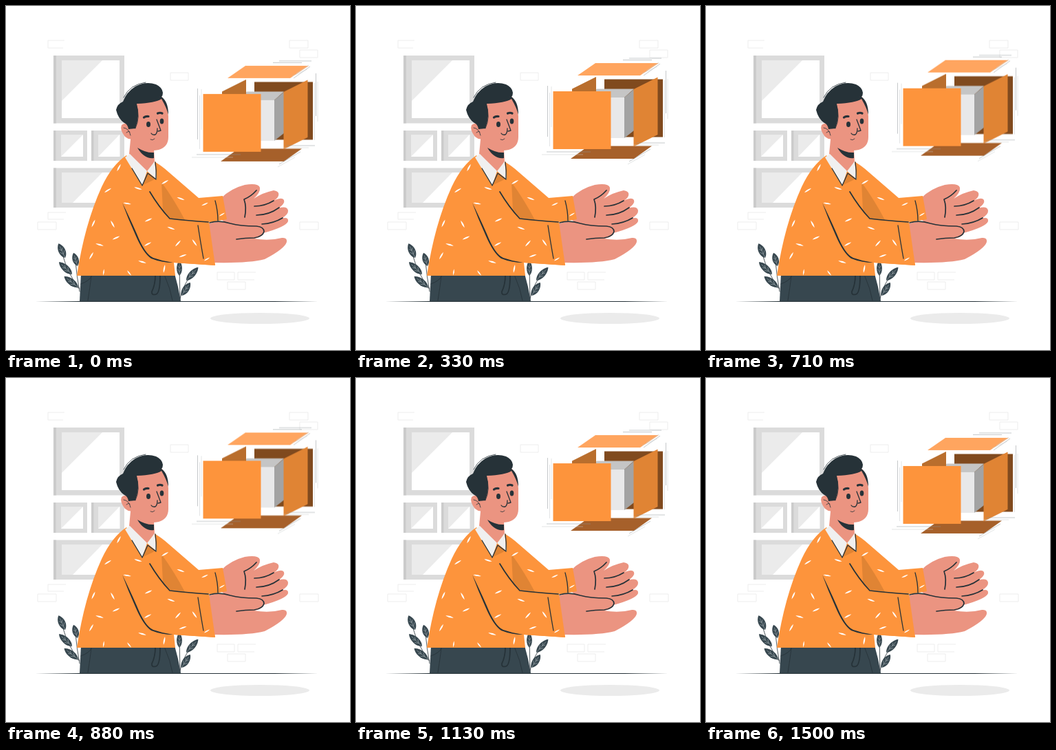
An HTML page without scripts for the animation above (1.54 s loop, 500 px wide and 500 px high).

```html
<!DOCTYPE html>
<html lang="en">
<head>
<meta charset="utf-8">
<title>Floating box</title>
<style>
  html, body { margin: 0; width: 100%; height: 100%; overflow: hidden; background: #fff; }
  svg { display: block; width: 100%; height: 100%; }
  .orange { fill: #fd943c; }
  .shade { fill: #e08434; }
  .skin { fill: #eb9481; }
  .dark { fill: #263238; }
  .slate { fill: #37474f; }
  .line { fill: none; stroke: #263238; stroke-width: 1.3; stroke-linecap: round; stroke-linejoin: round; }
  .thin { stroke-width: .8; }
  .bold { stroke-width: 1.7; }
  .brow { stroke-width: 3.2; }
  .brick { fill: none; stroke: #ededed; }
  .speed { fill: none; stroke: #8b9194; stroke-width: .5; }
  .faint { stroke: #c4c8ca; }
  .box { animation: float 770ms cubic-bezier(.37, 0, .63, 1) -40ms infinite alternate; }
  @keyframes float {
    from { transform: translateY(-.1px); }
    to { transform: translateY(-8.4px); }
  }
</style>
</head>
<body>
<svg viewBox="0 0 500 500">
  <defs>
    <path id="dash" d="M-6 0Q0-2.2 6 0Q0 2.2-6 0Z" fill="#fff"/>
    <g id="leaf">
      <path class="slate" d="M0 0C-8-5-7-15 0-20C7-15 8-5 0 0Z"/>
      <path d="M0 0V-16M0-5L-4-9M0-5L4-9M0-10L-3-13M0-10L3-13" fill="none" stroke="#9aa5aa" stroke-width=".6"/>
    </g>
  </defs>

  <!-- Wall -->
  <path class="brick" d="M85 50H61V61H83M239 97H265V108H239ZM439 61H412V50H439ZM427 64H453V75H427ZM87 300H61V310H84M46 314H73V325H46ZM454 325H427V314H454ZM332 387H307V398H332ZM337 398V387H363M337 398H361M322 401H348V412H322Z"/>
  <g fill="#dbdbdb">
    <path d="M69 72H172V170.500H69ZM69 181H118V225H69ZM124 181H172V225H124ZM69 235.500H172V293H69Z"/>
    <path fill="#cbcbcb" d="M69 72H73V170.500H69ZM69 181H72.500V225H69ZM124 181H127.500V225H124ZM69 235.500H73V293H69Z"/>
    <path fill="#fff" d="M81 79H165V163H81ZM80 187H112V219H80ZM134 187H165.500V219H134ZM81 242H165V286H81Z"/>
    <path fill="#ebebeb" d="M81 79H140L81 138ZM80 187H112L80 219ZM134 187H165L134 219ZM81 242H140L97 286H81Z"/>
  </g>

  <ellipse cx="369" cy="454" rx="72" ry="8" fill="#ebebeb"/>

  <!-- Plants -->
  <path class="line thin" d="M81 358Q91 393 107 411M101 372Q103 394 107 415M95 390L83 377M105 410L91 399M252 429Q257 404 274 384M253 429L252 374M256 420L263 408"/>
  <use href="#leaf" transform="translate(86 366) rotate(-25) scale(.9 1.150)"/>
  <use href="#leaf" transform="translate(96 390) rotate(-47) scale(.85 1.300)"/>
  <use href="#leaf" transform="translate(105 409) rotate(-52) scale(.85 1.300)"/>
  <use href="#leaf" transform="translate(104 378) rotate(-17) scale(.8 1.000)"/>
  <use href="#leaf" transform="translate(262 399) rotate(42) scale(.8 1.300)"/>
  <use href="#leaf" transform="translate(255 421) rotate(34) scale(.85 1.150)"/>
  <use href="#leaf" transform="translate(252 392) scale(.7 1.100)"/>

  <!-- Trousers and ground -->
  <path class="slate" d="M109 389H245Q251 409 254 429.500H107Z"/>
  <path class="line thin" d="M124 393Q122 399 109 404M124 393Q122 409 119 428M231 393Q239 411 242 428"/>
  <path class="line bold" d="M217 392Q217 405 212 415Q211 421 218 419Q224 417 224 392"/>
  <path class="dark" d="M42 429.500L107 429H390L454 429.500L390 430H107Z"/>

  <!-- Far arm and hand -->
  <path class="skin" d="M313 279Q327 265 347 260Q367 257 369 264Q370 271 360 280Q374 271 389 268Q398 269 396 276Q394 281 384 286Q400 276 404 282Q406 287 396 294Q408 290 410 297Q411 303 400 309Q411 306 410 313Q407 321 374 330L330 325L314 311Z"/>
  <path class="line bold" d="M364 268Q356 277 346 281Q350 292 347 307M361 291Q376 291 389 283M364 304Q382 304 397 293M372 317Q389 316 402 308"/>
  <path class="orange" d="M217 227Q226 232 236 241L280 279L315 276L321 310L298 314L240 311L211 280Z"/>

  <!-- Shirt -->
  <path class="orange" d="M175 217Q154 231 139 263Q114 318 103 392H246L244 373L304 377L295 314L238 309L226 256L217 226L197 245Z"/>
  <path class="shade" d="M226 256Q246 284 260 311L238 309L228 296Z"/>

  <!-- Near hand -->
  <path class="skin" d="M293 317Q309 311 326 316Q340 320 364 320Q375 321 375 328Q374 336 360 338Q382 342 401 337Q409 336 408 343Q405 353 376 368Q353 374 303 373Z"/>
  <path class="line bold" d="M296 315Q310 311 326 316Q340 320 364 320Q375 321 375 328Q373 335 361 337Q348 337 335 339"/>
  <path class="orange" d="M244 311L295 314L304 377L244 373Z"/>

  <path class="line bold" d="M209 270Q222 292 238 309Q264 312 294 314"/>
  <path class="dark" d="M169 286Q179 306 190 331Q202 361 214 366Q228 371 243 373Q226 373 211 367Q199 359 187 330Q177 308 169 286Z"/>
  <path class="line" d="M279 319Q283 345 287 367M304 283Q308 298 308 312"/>

  <g>
    <use href="#dash" transform="translate(148 268) rotate(-32)"/>
    <use href="#dash" transform="translate(164 235) rotate(-62)"/>
    <use href="#dash" transform="translate(176 287) rotate(10)"/>
    <use href="#dash" transform="translate(192 265) rotate(18)"/>
    <use href="#dash" transform="translate(231 256) rotate(-30)"/>
    <use href="#dash" transform="translate(207 311) rotate(-25)"/>
    <use href="#dash" transform="translate(155 317) rotate(62)"/>
    <use href="#dash" transform="translate(160 337) rotate(-25)"/>
    <use href="#dash" transform="translate(136 347) rotate(15)"/>
    <use href="#dash" transform="translate(127 316) rotate(-65)"/>
    <use href="#dash" transform="translate(206 346) rotate(-28)"/>
    <use href="#dash" transform="translate(240 323) rotate(20)"/>
    <use href="#dash" transform="translate(250 345) rotate(-48)"/>
    <use href="#dash" transform="translate(274 344) rotate(55)"/>
    <use href="#dash" transform="translate(124 363) rotate(-60)"/>
    <use href="#dash" transform="translate(142 387) rotate(-82) scale(.8)"/>
    <use href="#dash" transform="translate(179 388) rotate(52) scale(.8)"/>
    <use href="#dash" transform="translate(198 372) rotate(15)"/>
    <use href="#dash" transform="translate(230 382) rotate(-80)"/>
    <use href="#dash" transform="translate(257 363) rotate(-20)"/>
    <use href="#dash" transform="translate(292 368) rotate(-30) scale(.8)"/>
    <use href="#dash" transform="translate(254 280) rotate(20)"/>
    <use href="#dash" transform="translate(289 288) rotate(-25) scale(.9)"/>
    <use href="#dash" transform="translate(314 303) rotate(-30) scale(.8)"/>
  </g>

  <!-- Neck and collar -->
  <path class="skin" d="M182 184L179 215L205 240L216 226L215 208Z"/>
  <path class="dark" d="M191 206Q204 214 215 213V221Q201 223 191 206Z"/>
  <path class="shade" d="M199 260L206 244L217 251L212 254Z"/>
  <path fill="#f0f0f0" d="M173 220L180 215L205 240L198 261ZM205 240L216 226L219 252Z"/>
  <path class="line" d="M183 236L198 261L206 243L218 252Q219 239 217 227"/>

  <!-- Head -->
  <path class="skin" d="M186 140L225 130Q234 139 236 160L236 190Q236 205 222 209Q207 212 190 205L181 193Z"/>
  <path class="skin" d="M185 177Q175 167 168 173Q165 180 173 190Q179 195 185 193Z"/>
  <path class="line thin" d="M171 177Q179 178 181 188M175 184Q178 181 180 183"/>
  <path class="dark" d="M188 178L178 179Q177 172 172 170Q163 164 160 151Q162 142 170 139Q175 125 188 117Q203 109 218 114Q227 118 228 126Q228 130 226 132Q236 139 236 158Q234 149 226 135Q217 141 190 142Q195 159 188 178Z"/>
  <path class="line thin" d="M171 133Q180 114 203 111M189 143Q196 161 188 178"/>
  <ellipse class="dark" cx="207" cy="172" rx="3" ry="4"/>
  <ellipse class="dark" cx="226.500" cy="167.500" rx="2.800" ry="4"/>
  <path class="line brow" d="M200.500 162Q203 160 207 160.500M220.500 156Q224 154.500 227 156"/>
  <path class="line" d="M219 165L225 181L221 182"/>
  <path class="line" d="M220 178Q220 185 217 187Q213 188 211 185"/>
  <path class="line thin" d="M210 194Q213 196 216 193"/>

  <!-- Box -->
  <g class="box">
    <path fill="#ffa55f" d="M348 87H440L413 105H322Z"/>
    <path fill="#a6602a" d="M338 207.500H430L404 226H312Z"/>
    <path fill="#804a1e" d="M361 110.500H446V194.500H361Z"/>
    <path fill="#c5c5c5" d="M336 137L350 124.500H404L390 137Z"/>
    <path fill="#e8e8e9" d="M340 137H390V196H340Z"/>
    <path fill="#a3a3a3" d="M390 137L404 125V185L390 196Z"/>
    <path fill="#b96e2d" d="M314 124.500L349 107V191L314 208Z"/>
    <path class="shade" d="M403.500 125L438.500 107.500V191L403.500 208.500Z"/>
    <path class="orange" d="M286.500 128H370.500V212H286.500Z"/>
    <path class="speed" d="M397 80H444M388 82.500H430M418 105L442 88M450.500 98V160M408 203H449M277 216H341M278.500 120V194M397 230L428 212"/>
    <path class="speed faint" d="M422 98L440 86M416 102L438 92M448.500 112V195M453 110V168M404 206H440M270 220H330M281.500 130V208M284 121V180M395 234L420 220"/>
  </g>
</svg>
</body>
</html>
```
